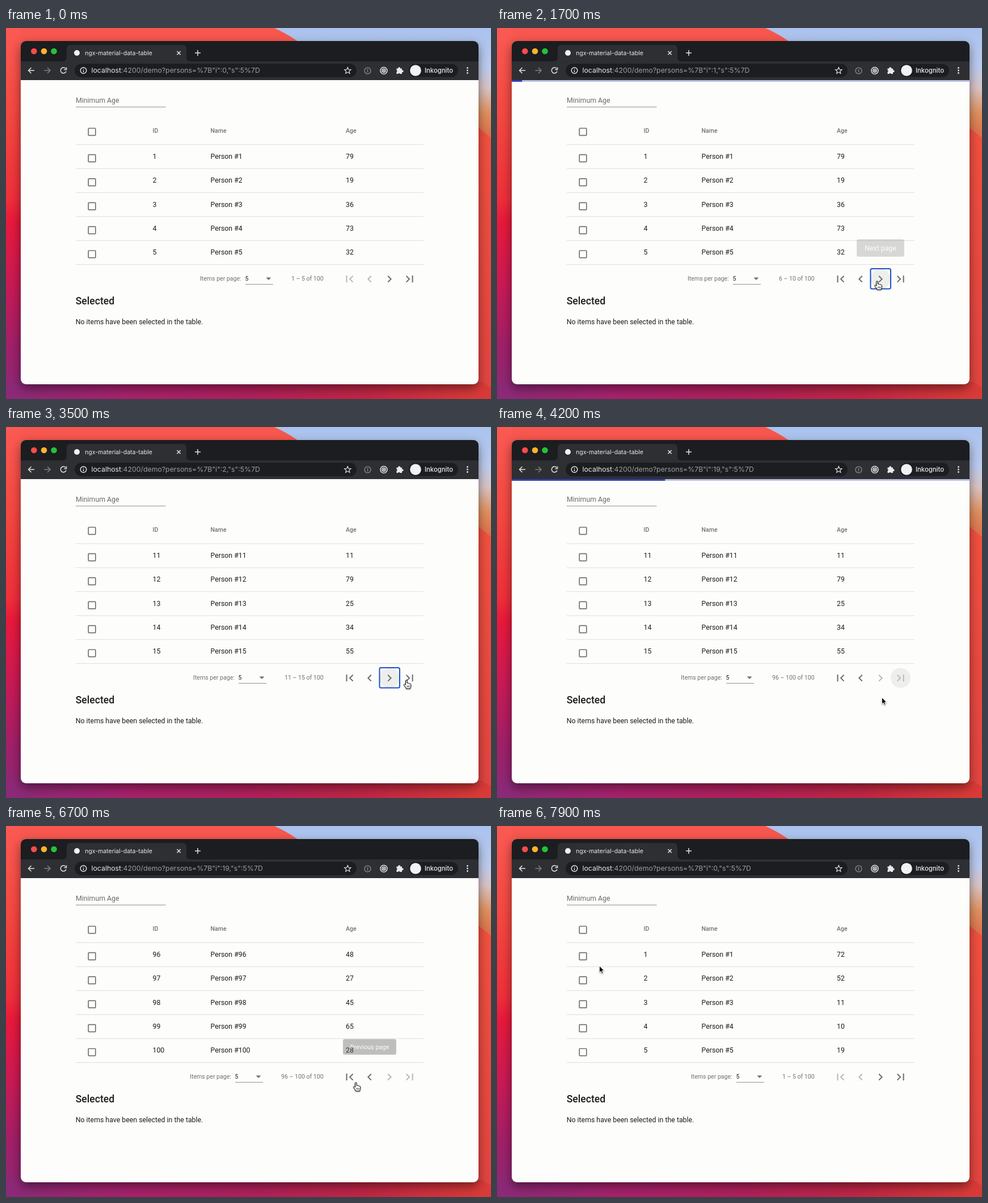
An HTML page for the animation above (8000 ms loop, 855 by 655 pixels).

```html
<!DOCTYPE html>
<html lang="en">
<head>
<meta charset="utf-8">
<title>Data table</title>
<style>
html, body { margin: 0; width: 100%; height: 100%; overflow: hidden; }
body { position: relative; }
svg { display: block; position: absolute; left: 0; top: 0; }
text { font: 12.33px Roboto, sans-serif; fill: #1c1c1c; white-space: pre; }
.ui { font-family: Inter, sans-serif; fill: #e8eaed; }
.small { font-size: 10.57px; fill: #707070; }
.head { font-size: 10.57px; font-weight: 500; fill: #717171; }
.icon { fill: none; stroke: #e3e4e6; stroke-width: 1.5; }
.dim { stroke: #7d7f82; }
#bar { position: absolute; left: 26px; top: 92px; width: 807px; height: 3.4px; overflow: hidden; background: #b9c0e6; }
#slide { position: absolute; left: -54.888891%; width: 100%; height: 100%; }
#fill { height: 100%; background: #3541b8; }
</style>
</head>
<body>
<svg id="stage" width="855" height="655" viewBox="0 0 855 655"></svg>
<div id="bar"><div id="slide"><div id="fill"></div></div></div>
<svg id="top" width="855" height="655" viewBox="0 0 855 655">
  <g id="tip">
    <rect id="tipBox" y="-30.8" height="30.8" rx="3.5" fill="#616161" fill-opacity=".9"/>
    <text id="tipText" y="-11.2" text-anchor="middle" style="fill:#fff"></text>
  </g>
  <g id="cursor" style="filter:drop-shadow(0 1px 1px #0006)">
    <path id="arrow" d="M0 0V11.8L2.7 9.3 4.5 13.5 6.6 12.6 4.8 8.5H8.4Z" stroke="#fff"/>
    <g id="hand" fill="#fff" stroke="#000">
      <path d="M-1.5 .8C-1.5-.6 1-.6 1 .8V5.2C1.6 4.6 3.2 4.8 3.4 5.8C4 5.1 5.6 5.4 5.7 6.5C6.4 6 7.8 6.4 7.8 7.6V10.5C7.8 12.5 6.6 13 6.6 15H-.4C-.4 13-3 11.2-4.4 8.4C-5 7.1-3.2 6.4-2.2 7.6L-1.5 8.4Z"/>
      <path d="M1.2 9.5V12.5M3.2 9.5V12.5M5.2 9.5V12.5" stroke-width=".8"/>
    </g>
  </g>
</svg>
<script>
const LOOP = 8000, ROW = 42.33;
const $ = id => document.getElementById(id);
const set = (id, attrs) => { for (const k in attrs) $(id).setAttribute(k, attrs[k]); };
const show = (id, on) => { $(id).style.display = on ? '' : 'none'; };
const text = (x, y, s, attrs = '') => `<text x="${x}" y="${y}" ${attrs}>${s}</text>`;
const line = (x1, x2, y, c) => `<path d="M${x1} ${y}H${x2}" stroke="${c}"/>`;
const check = y => `<rect x="145.2" y="${y}" width="12.6" height="12.6" rx="1" fill="none" stroke="#717171" stroke-width="1.7"/>`;
const icon = (d, cls = '') => `<path class="icon ${cls}" d="${d}"/>`;
const ring = (x, y, r, cls = '') => `<circle class="icon ${cls}" cx="${x}" cy="${y}" r="${r}"/>`;
const dot = (x, y, r, c) => `<circle cx="${x}" cy="${y}" r="${r}" fill="${c}"/>`;
const gradient = (id, vertical, size, stops) =>
  `<linearGradient id="${id}" gradientUnits="userSpaceOnUse" x2="${vertical ? 0 : size}" y2="${vertical ? size : 0}">` +
  stops.map(([o, c]) => `<stop offset="${o}" stop-color="${c}"/>`).join('') + '</linearGradient>';

// Pager buttons: first, previous, next, last
const buttonX = [605.7, 641, 676, 711.5];
const buttonPath = [
  'M18.41 16.59L13.82 12l4.59-4.59L17 6l-6 6 6 6zM6 6h2v12H6z',
  'M15.41 7.41L14 6l-6 6 6 6 1.41-1.41L10.83 12z',
  'M10 6L8.59 7.41 13.17 12l-4.58 4.59L10 18l6-6z',
  'M5.59 7.41L10.18 12l-4.59 4.59L7 18l6-6-6-6zM16 6h2v12h-2z'];

const wallpaper = `<defs>
  ${gradient('left', true, 655, [[0, '#fa5a53'], [.25, '#f4473f'], [.46, '#ef2f3b'], [.52, '#e9193b'], [.69, '#c91a55'], [.86, '#a02069'], [1, '#8a2a78']])}
  ${gradient('right', true, 655, [[.3, '#f0503f'], [1, '#e04440']])}
  ${gradient('bottom', false, 855, [[0, '#8a2a78'], [.25, '#a8226c'], [.5, '#b0205c'], [.75, '#c02644'], [.97, '#d83a38']])}
  ${gradient('sky', true, 200, [[0, '#a9c2ee'], [.35, '#bccbed'], [.53, '#d9c3c4'], [.75, '#e0905f'], [.95, '#dc6f4c']])}
  <clipPath id="frame"><rect x="26" y="23" width="807" height="606" rx="9"/></clipPath></defs>
  <rect width="855" height="655" fill="url(#left)"/>
  <rect x="400" width="455" height="655" fill="url(#right)"/>
  <rect x="26" width="829" height="40" fill="#f7574e"/>
  <rect y="625" width="855" height="30" fill="url(#bottom)"/>
  <path d="M833 620L855 635V200H833Z" fill="url(#right)"/>
  <path d="M473 0Q497 11 515 24L833 176 855 194V0Z" fill="url(#sky)"/>`;

const browser = `
  <rect x="26" y="23" width="807" height="606" rx="9" style="filter:drop-shadow(0 7px 9px #0007)"/>
  <g clip-path="url(#frame)">
    <rect x="26" y="23" width="807" height="606" fill="#fdfdfc"/>
    <rect x="26" y="23" width="807" height="37" fill="#1b1d20"/>
    <rect x="26" y="59" width="807" height="33" fill="#2e2f33"/>
    <path d="M100 59Q107 59 107 52V37Q107 30 114 30H311Q318 30 318 37V52Q318 59 325 59Z" fill="#2e2f33"/>
  </g>
  ${dot(49.3, 41, 5.3, '#fb4b4a')}${dot(67, 41, 5.3, '#fdb32b')}${dot(84.5, 41, 5.3, '#25c138')}
  ${dot(125, 44, 5, '#f1f1f1')}
  ${text(139, 48, 'ngx-material-data-table', 'class="ui" style="font-size:10.55px"')}
  ${icon('M301.5 41L307.700 47.200M307.700 41L301.500 47.200M333 44H343M338 39V49')}
  ${icon('M50 75H39.500M44.500 70L39.500 75 44.500 80')}
  ${icon('M67.500 75H78M73 70L78 75 73 80', 'dim')}
  ${icon('M105 71.500A5 5 0 1 0 106 76.500M106.500 69.500V73.500H102.500')}
  <rect x="121" y="63" width="497" height="24" rx="12" fill="#1b1d20"/>
  ${ring(136.500, 75, 5.3)}${icon('M136.500 74.500V78M136.500 72V73.300')}
  <text class="ui" x="150.500" y="79.300" style="font-size:12.3px">localhost<tspan id="url" fill="#9b9ea3"></tspan></text>
  <path class="icon" stroke-width="1.2" style="stroke-width:1.2" d="M602.300 69.500L603.900 73.300 608 73.600 604.900 76.300 605.900 80.300 602.300 78.100 598.700 80.300 599.700 76.300 596.600 73.600 600.700 73.300Z"/>
  ${ring(637.500, 75.500, 5.5, 'dim')}${icon('M637.500 72.500V78.500', 'dim')}
  ${ring(666, 75.300, 6)}${ring(666, 75.300, 3)}${dot(666, 75.300, 1.5, '#e3e4e6')}
  <path d="M688.500 71.500H691.300A1.900 1.900 0 1 1 695 71.500H698V74.500A1.900 1.900 0 1 1 698 78V81H694.500A1.700 1.700 0 0 0 691.300 81H688.500V77.700A1.700 1.700 0 0 0 688.500 74.500Z" fill="#e8eaed"/>
  <rect x="710" y="63.500" width="87" height="23" rx="11.5" fill="#1b1d20"/>
  ${dot(722, 75, 9.8, '#f1f2f4')}
  ${text(738, 79.2, 'Inkognito', 'class="ui" style="font-size:11.3px;font-weight:500"')}
  ${[70.5, 75, 79.5].map(y => dot(813.5, y, 1.4, '#e3e4e6')).join('')}`;

const rowMarkup = [0, 1, 2, 3, 4].map(r => {
  const y = r * ROW;
  return check(223.7 + y) + ['id', 'name', 'age'].map((k, c) =>
    text([258.500, 360.500, 599][c], 231 + y, '', `id="${k}${r}"`)).join('') + line(123, 736, 248.3 + y, '#dededc');
}).join('');

const page = `
  ${text(123, 132.300, 'Minimum Age', 'style="fill:#6b6b6b"')}
  ${line(123, 281.500, 139.500, '#929292')}
  ${check(177)}
  ${text(258.500, 184.500, 'ID', 'class="head"')}${text(360.500, 184.500, 'Name', 'class="head"')}${text(599, 184.500, 'Age', 'class="head"')}
  ${line(123, 736, 205.900, '#dededc')}
  <g id="rows">${rowMarkup}</g>
  <g id="footer">
    <g id="size">
      ${text(0, 446, 'Items per page:', 'class="small"')}
      ${text(79.500, 446, '5', 'style="font-size:10.57px"')}
      ${line(80, 129, 452.500, '#929292')}
      <path d="M116.500 440.500H125.500L121 445Z" fill="#717171"/>
    </g>
    ${text(559.700, 446, '', 'id="range" class="small" text-anchor="end"')}
    <circle id="focus" cy="443" r="17.6" fill="#000" fill-opacity=".06"/>
    <rect id="outline" x="658.500" y="425" width="35.500" height="35.500" rx="2.500" fill="none" stroke="#1d50c8" stroke-width="2"/>
    ${buttonPath.map((d, i) => `<path id="button${i}" d="${d}" transform="translate(${buttonX[i]} 443.200) scale(1.028) translate(-12 -12)"/>`).join('')}
    ${text(122.700, 487.500, 'Selected', 'style="font-size:17.6px;font-weight:500"')}
    ${text(122.700, 522.700, 'No items have been selected in the table.')}
  </g>`;
$('stage').innerHTML = wallpaper + browser + page;

// Progress bar motion, scrubbed by the clock
const scrub = (id, frames) => {
  const a = $(id).animate(frames.map(([offset, transform, bezier]) =>
    ({ offset, transform, easing: bezier ? `cubic-bezier(${bezier})` : 'linear' })), { duration: 2000, fill: 'both' });
  a.pause();
  return a;
};
const barMotion = [
  scrub('slide', [
    [0, 'translateX(0)', '.15,0,.515058,.409685'],
    [.25, 'translateX(37.651913%)', '.31033,.284058,.8,.733712'],
    [.4835, 'translateX(84.386165%)', '.4,.627035,.6,.902026'],
    [1, 'translateX(160.277782%)']]),
  scrub('fill', [
    [0, 'scaleX(.08)', '.205028,.057051,.57661,.453971'],
    [.1915, 'scaleX(.457104)', '.152313,.196432,.648374,1.004315'],
    [.4415, 'scaleX(.72796)', '.257759,-.003163,.211762,1.38179'],
    [1, 'scaleX(.08)']])];

// Timeline
const pages = [[0, 0], [1645, 1], [2610, 2], [3895, 19], [6950, 0]];
const data = [
  [0, 1, [79, 19, 36, 73, 32]], [2430, 6, [34, 67, 65, 16, 47]], [3400, 11, [11, 79, 25, 34, 55]],
  [4690, 96, [31, 62, 17, 74, 40]], [5510, 0, []], [6310, 96, [48, 27, 45, 65, 28]], [7750, 1, [72, 52, 11, 10, 19]]];
const loads = [[1645, 2430], [2610, 3400], [3895, 4690], [5510, 6310], [6950, 7750]];
const tips = [
  ['Next page', 2, 1250, 1665], ['Last page', 3, 3500, 3895],
  ['Previous page', 1, 6665, 6740], ['First page', 0, 6790, 6950]];
const path = [
  [500, 700, 660], [1200, 670.5, 447], [2950, 670.5, 447], [3480, 706, 447], [3900, 706, 447],
  [4190, 678.5, 477.5], [4800, 678.5, 477.5], [5450, 644, 466.5], [6250, 644, 466.5], [6480, 641, 450],
  [6580, 639, 450], [6700, 617, 453], [6790, 608, 449], [7050, 608, 449], [7850, 180.5, 247]];

const clamp = x => Math.min(1, Math.max(0, x));
const easeOut = x => 1 - (1 - clamp(x)) ** 3;
const latest = (list, t) => list.filter(e => e[0] <= t).pop();

function pointer(t) {
  const i = path.findIndex(k => k[0] > t);
  if (i < 0) return path[path.length - 1].slice(1);
  const a = path[i - 1], b = path[i], p = (t - a[0]) / (b[0] - a[0]), e = p * p * (3 - 2 * p);
  return [a[1] + (b[1] - a[1]) * e, a[2] + (b[2] - a[2]) * e];
}

function draw(t) {
  const index = latest(pages, t)[1], [, first, ages] = latest(data, t), empty = !ages.length;
  $('url').textContent = `:4200/demo?persons=%7B"i":${index},"s":5%7D`;
  show('rows', !empty);
  ages.forEach((age, r) => {
    $('id' + r).textContent = first + r;
    $('name' + r).textContent = 'Person #' + (first + r);
    $('age' + r).textContent = age;
  });

  set('footer', { transform: `translate(0 ${empty ? -5 * ROW : 0})` });
  $('range').textContent = empty ? '0 of 0' : `${index * 5 + 1} – ${index * 5 + 5} of 100`;
  set('size', { transform: `translate(${398.7 - $('range').getComputedTextLength()} 0)` });
  const enabled = [index > 0, index > 0, index < 19, index < 19];
  enabled.forEach((on, i) => set('button' + i, { fill: on ? '#6f6f6f' : '#b9b9b9' }));
  const onNext = t >= 1645 && t < 3895;
  show('outline', onNext);
  show('focus', onNext || t >= 3895 && t < 5510);
  set('focus', { cx: buttonX[onNext ? 2 : 3] });

  const load = loads.find(([a, b]) => t >= a && t < b);
  show('bar', load);
  if (load) barMotion.forEach(a => { a.currentTime = t - load[0]; });

  const tip = tips.find(([, , a, b]) => t >= a && t < b + 100);
  show('tip', tip);
  if (tip) {
    const [label, button, a, b] = tip, e = easeOut((Math.min(t, b) - a) / 200);
    const scale = e < .5 ? e * 1.98 : .98 + e * .02;
    $('tipText').textContent = label;
    const w = $('tipText').getComputedTextLength() + 28.2;
    set('tipBox', { x: -w / 2, width: w });
    set('tip', { transform: `translate(${buttonX[button]} 403.700) scale(${scale})`, opacity: e * (1 - easeOut((t - b) / 100)) });
  }

  show('cursor', t >= 500);
  if (t >= 500) {
    const [x, y] = pointer(t);
    const over = !empty && buttonX.some((bx, i) => enabled[i] && Math.hypot(x - bx, y - 443) < 17.6);
    set('cursor', { transform: `translate(${x} ${y})` });
    show('hand', over);
    show('arrow', !over);
  }
}

function tick() {
  draw(performance.now() % LOOP);
  requestAnimationFrame(tick);
}
tick();
</script>
</body>
</html>
```
